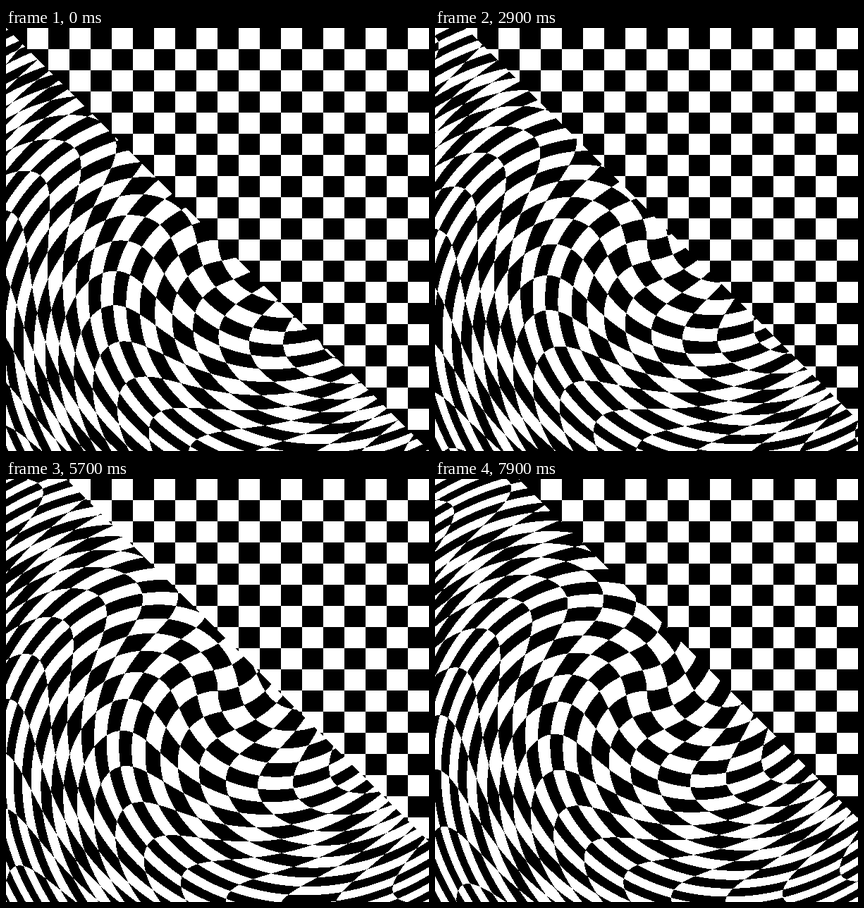
Write an HTML page with a canvas that moves like this. It is 600 px wide and 600 px high and loops after 8 s.

```html
<!DOCTYPE html>
<html lang="en">
<head>
<meta charset="utf-8">
<title>Twisting checkerboard</title>
<style>
  html, body { margin: 0; width: 100%; height: 100%; overflow: hidden; background: #fff; }
  canvas { display: block; width: 600px; height: 600px; }
</style>
</head>
<body>
<canvas id="stage" width="600" height="600"></canvas>
<script>
const SIZE = 600, MID = SIZE / 2, CELL = 30;
const LOOP = 8000, STEP = 100;
const BLACK = 0xff000000, WHITE = 0xffffffff;

const ctx = document.getElementById('stage').getContext('2d');
const image = ctx.createImageData(SIZE, SIZE);
const pixels = new Uint32Array(image.data.buffer);

// u and v are measured from the centre, which is a corner of the board's cells
const board = (u, v) =>
  (Math.floor(u / CELL) + Math.floor(v / CELL)) & 1 ? WHITE : BLACK;

function draw(step) {
  const edge = 1.5 * step;                   // diagonal x - y = edge
  const twist = 2 * Math.PI / (1000 - edge); // radians per pixel of radius
  let i = 0;
  for (let y = -MID; y < MID; y++) {
    for (let x = -MID; x < MID; x++) {
      if (x - y > edge) {
        pixels[i++] = board(x, y);
      } else {
        const a = twist * Math.sqrt(x * x + y * y);
        const c = Math.cos(a), s = Math.sin(a);
        pixels[i++] = board(x * c - y * s, x * s + y * c);
      }
    }
  }
  ctx.putImageData(image, 0, 0);
}

let shown = -1;
const start = performance.now();

function tick() {
  const time = (performance.now() - start) % LOOP;
  const step = Math.floor(time / STEP);
  if (step !== shown) draw(shown = step);
  requestAnimationFrame(tick);
}
tick();
</script>
</body>
</html>
```
